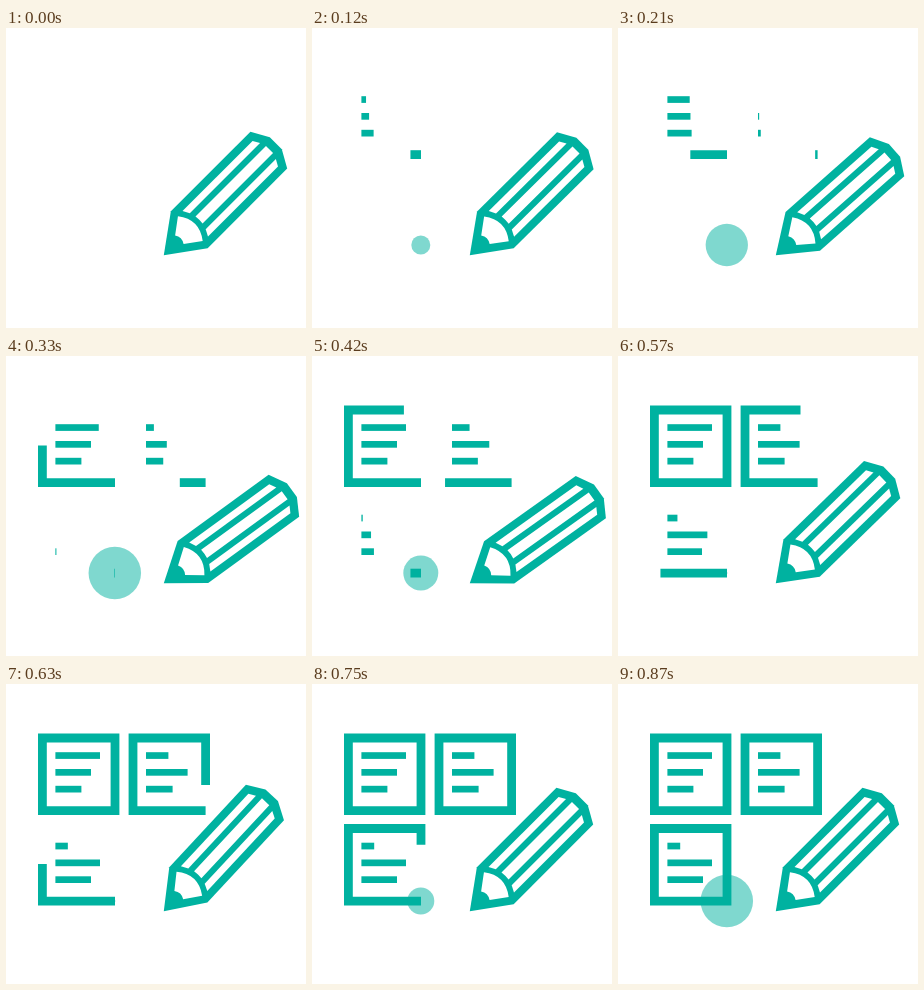
An HTML page with a canvas that plays this animation: 300x300 px, repeating every 900 ms.

```html
<!DOCTYPE html>
<html lang="en">
<head>
<meta charset="utf-8">
<title>Pencil and notes</title>
<style>
  html, body { margin: 0; width: 100%; height: 100%; overflow: hidden; background: #fff; }
  canvas { display: block; width: 300px; height: 300px; }
</style>
</head>
<body>
<canvas id="stage" width="300" height="300"></canvas>
<script>
const ctx = document.getElementById('stage').getContext('2d');
const TEAL = '#00b2a0';
const LOOP = 900, STEP = 30;
const SIDE = 72.6;

// Each note: top left of its outline, start time, and the lengths of its text lines.
const notes = [
  { x: 36.4, y: 54, start: 0, lines: [44.6, 35.6, 26] },
  { x: 127, y: 54, start: 150, lines: [22.4, 41.6, 26.6] },
  { x: 36.4, y: 144.5, start: 300, lines: [12.8, 44.6, 35.6] }
];

const progress = (t, start, length) => Math.min(1, Math.max(0, (t - start) / length));
const smooth = p => p * p * (3 - 2 * p);
const ease = (t, start, length) => smooth(progress(t, start, length));

function bezierEase(p, x1, y1, x2, y2) {
  const at = (s, a, b) => 3 * a * s * (1 - s) ** 2 + 3 * b * s * s * (1 - s) + s ** 3;
  let low = 0, high = 1;
  for (let i = 0; i < 24; i++) {
    const mid = (low + high) / 2;
    if (at(mid, x1, x2) < p) low = mid; else high = mid;
  }
  return at(high, y1, y2);
}

// Outline grows clockwise from the bottom right corner.
function drawOutline(x, y, part) {
  if (part <= 0) return;
  const r = x + SIDE, b = y + SIDE;
  ctx.lineWidth = 8.8;
  ctx.setLineDash([]);
  ctx.beginPath();
  if (part >= 1) {
    ctx.rect(x, y, SIDE, SIDE);
  } else {
    ctx.setLineDash([part * SIDE * 4, SIDE * 8]);
    ctx.moveTo(r, b);
    for (const [px, py] of [[x, b], [x, y], [r, y], [r, b]]) ctx.lineTo(px, py);
  }
  ctx.stroke();
  ctx.setLineDash([]);
}

function drawNote({ x, y, start, lines }, t) {
  const p = progress(t, start, 510);
  drawOutline(x, y, p > 0 && p < 1 ? bezierEase(p, 0.64, 0, 0.77, 0.7) : p);
  lines.forEach((length, i) => {
    const time = start === 0 && i === 2 ? 250 : 300;
    const width = length * ease(t, start + (2 - i) * 30, time);
    ctx.fillRect(x + 13, y + 14.2 + i * 16.8, width, 6.7);
  });
}

function drawDot(t) {
  const size = t < 300 ? ease(t, 0, 300)
    : t < 600 ? 1 - ease(t, 300, 300)
    : ease(t, 600, 300);
  ctx.globalAlpha = 0.5;
  ctx.beginPath();
  ctx.arc(108.8, 217, 27 * size, 0, Math.PI * 2);
  ctx.fill();
  ctx.globalAlpha = 1;
}

function polygon(points, color) {
  ctx.fillStyle = color;
  ctx.beginPath();
  points.forEach(([x, y]) => ctx.lineTo(x, y));
  ctx.closePath();
  ctx.fill();
}

function pencilAngle(t) {
  if (t < 390) return 10 * ease(t, 90, 300);
  if (t < 660) return 10 - 12.5 * ease(t, 390, 270);
  return -2.5 * (1 - ease(t, 660, 90));
}

// The pencil lies along the x axis with its tip at the origin.
function drawPencil(t) {
  ctx.save();
  ctx.translate(157.8, 227.2);
  ctx.rotate((pencilAngle(t) - 45) * Math.PI / 180);
  polygon([[0, 0], [36, -26], [148.5, -26], [158.4, -8.5],
    [158.4, 8.5], [148.5, 26], [36, 26]], TEAL);
  for (const side of [-1, 1]) {
    polygon([[44.5, 18], [48, 11.2], [147.3, 11.2], [143.5, 18]]
      .map(([x, y]) => [x, y * side]), '#fff');
  }
  polygon([[49.8, -5], [50.2, 0], [49.8, 5], [149.5, 5], [149.5, -5]], '#fff');
  ctx.beginPath();
  ctx.moveTo(37.5, -17.5);
  ctx.quadraticCurveTo(51, 0, 37.5, 17.5);
  ctx.lineTo(22, 6);
  ctx.quadraticCurveTo(26, 0, 22, -6);
  ctx.fill();
  ctx.restore();
}

function draw(t) {
  ctx.fillStyle = '#fff';
  ctx.fillRect(0, 0, 300, 300);
  ctx.fillStyle = ctx.strokeStyle = TEAL;
  notes.forEach(note => drawNote(note, t));
  drawDot(t);
  drawPencil(t);
}

function tick() {
  draw(Math.floor(performance.now() % LOOP / STEP) * STEP);
  requestAnimationFrame(tick);
}
tick();
</script>
</body>
</html>
```
